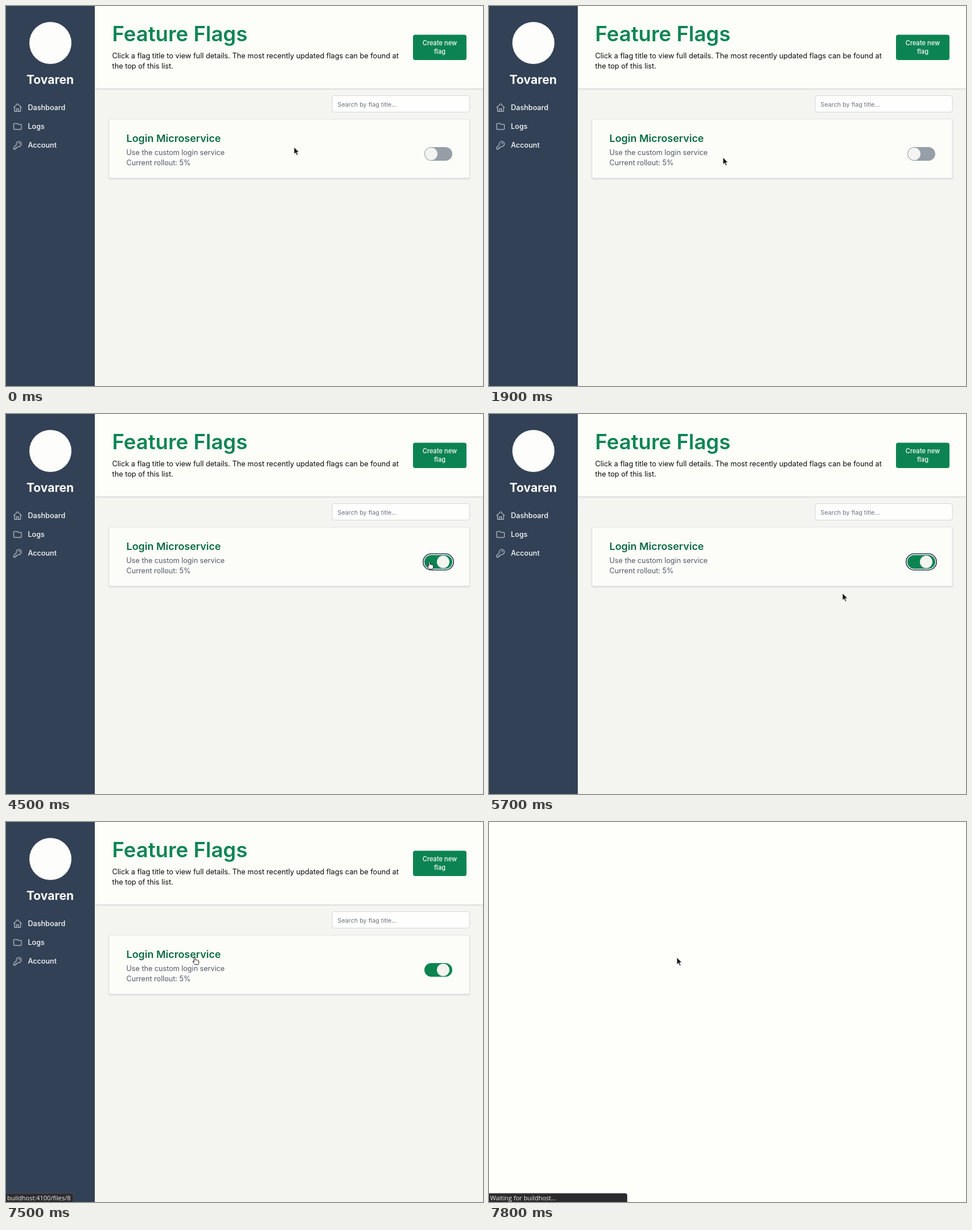
Animation, 838 px wide and 668 px high, one loop 8 s. Source, as an HTML page:

```html
<!DOCTYPE html>
<html lang="en">
<head>
<meta charset="utf-8">
<title>Feature flags</title>
<style>
  html, body { margin: 0; width: 100%; height: 100%; overflow: hidden; }
  svg { display: block; font-family: Inter, sans-serif; font-size: 12.73px; }
  .h { font-weight: 600; }
  .nav text { fill: #fbfcfa; font-size: 12.6px; font-weight: 500; }
  .nav path { fill: none; stroke: #a4adb8; stroke-width: 2; stroke-linecap: round; stroke-linejoin: round; }
  .grey { fill: #4f5966; font-size: 12.6px; }
  .btn { fill: #fdfdfa; font-size: 11.1px; font-weight: 500; text-anchor: middle; }
  .tip { fill: #f2f2f0; font-family: "Open Sans", sans-serif; font-size: 11px; }
  .card { filter: drop-shadow(0 1px 1px rgba(30, 40, 60, .2)); }
</style>
</head>
<body>
<svg width="838" height="668" viewBox="0 0 838 668">
  <rect width="838" height="668" fill="#f4f4f1"/>
  <rect class="card" x="156" width="682" height="145" fill="#fdfdf9"/>
  <rect width="156" height="668" fill="#324156"/>

  <circle cx="78" cy="65" r="37" fill="#fdfdfb"/>
  <text x="77.5" y="136.5" fill="#fdfdfb" font-size="21" font-weight="700" text-anchor="middle">Tovaren</text>
  <g id="nav" class="nav"></g>

  <text class="h" x="186.5" y="62" fill="#0f8554" font-size="36.5">Feature Flags</text>
  <g fill="#0b0c0b">
    <text x="186.5" y="92.3">Click a flag title to view full details. The most recently updated flags can be found at</text>
    <text x="186.5" y="110.3">the top of this list.</text>
  </g>
  <rect x="715" y="50.5" width="94" height="44.5" rx="4" fill="#0c8452"/>
  <text class="btn" x="762" y="69">Create new</text>
  <text class="btn" x="762" y="84">flag</text>

  <rect x="573" y="157.5" width="241.3" height="29" rx="4" fill="#fefefd" stroke="#d2d5da"/>
  <text x="582.5" y="176.5" fill="#6c7480" font-size="10.75">Search by flag title...</text>

  <rect class="card" x="181" y="199" width="633" height="103.4" rx="1.5" fill="#fcfcf9" stroke="#e3e4e4" stroke-width=".7"/>
  <text class="h" x="211.5" y="239" fill="#0b6c44" font-size="17.95">Login Microservice</text>
  <text class="grey" x="211.5" y="261.8">Use the custom login service</text>
  <text class="grey" x="211.5" y="279.8">Current rollout: 5%</text>

  <rect id="ring" x="732.8" y="245.8" width="53.4" height="28.4" rx="14.2" fill="#fefefd" stroke="#22344a" stroke-width="1.6"/>
  <rect id="track" x="735" y="248" width="49" height="24" rx="12"/>
  <circle id="knob" cy="260" r="11" fill="#f4f4f0"/>

  <rect id="blank" width="838" height="668"/>
  <g id="status">
    <rect id="bar" x="-4" y="653" height="20" rx="3" fill="#2b2b2d" stroke="#4b4b4c"/>
    <text id="note" class="tip" x="2" y="664.8"></text>
  </g>

  <g id="cursor">
    <path id="arrow" d="M0 0V12.6L2.9 9.9L4.9 14.6L7 13.7L5 9.1H8.8Z" fill="#161616" stroke="#f4f4f4" stroke-width=".9"/>
    <path id="hand" d="M-1.3 7.6V.5a1.1 1.1 0 0 1 2.2 0V4.4Q2.5 3.7 3 4.9Q4.5 4.3 5 5.5Q6.8 5 6.8 7V9Q6.8 11 5.5 12.8H0Q-1.5 10.5-3.6 8Q-4.2 6.5-3 6.2Z" fill="#fdfdfd" stroke="#1c1c1c"/>
    <path id="beam" d="M-2.5-6.5H2.5M0-6.5V6.5M-2.5 6.5H2.5" fill="none" stroke="#222"/>
  </g>
</svg>
<script>
  const LOOP = 8000, STEP = 100;
  const PRESS = 4100, BLUR = 7500, LEAVE = 7700, LOAD = 7800;
  const el = id => document.getElementById(id);
  const show = (id, on) => el(id).setAttribute('visibility', on ? 'visible' : 'hidden');
  const set = (id, name, value) => el(id).setAttribute(name, value);
  const progress = (t, from, to) => Math.min(1, Math.max(0, (t - from) / (to - from)));
  const easeOut = k => Math.sin(k * Math.PI / 2);
  const easeInOut = k => k * k * (3 - 2 * k);

  const links = {
    Dashboard: 'M3 12l9-9 9 9M5 10v11h14V10M9.5 21v-6h5v6',
    Logs: 'M3 7v10a2 2 0 002 2h14a2 2 0 002-2V9a2 2 0 00-2-2h-6l-2-2H5a2 2 0 00-2 2z',
    Account: 'M3 21v-4l6.3-6.3a6 6 0 1 1 4 4L11 17H9v2H7v2zM15 7a2 2 0 0 1 2 2'
  };
  el('nav').innerHTML = Object.entries(links).map(([name, icon], i) => `
    <g transform="translate(0 ${178.5 + 33.2 * i})">
      <path transform="translate(11.3 -9) scale(.75)" d="${icon}"/>
      <text x="38.5" y="4.5">${name}</text>
    </g>`).join('');

  // Pointer moves: start, end, x, y reached
  const moves = [
    [500, 900, 466, 253],
    [1000, 1400, 401, 264],
    [1600, 1900, 411, 266],
    [2000, 3400, 744, 260],
    [5000, 5200, 736, 262],
    [5300, 5700, 621, 315],
    [5800, 6200, 448, 299],
    [6300, 6500, 405, 273],
    [6600, 7300, 332, 238]
  ];

  function pointer(t) {
    let x = 506, y = 248;
    for (const [from, to, toX, toY] of moves) {
      const k = easeOut(progress(t, from, to));
      x += (toX - x) * k;
      y += (toY - y) * k;
    }
    return [x, y];
  }

  const within = (x, y, left, top, right, bottom) =>
    x >= left && x <= right && y >= top && y <= bottom;

  function draw(ms) {
    const t = Math.floor(ms % LOOP / STEP) * STEP;
    const [x, y] = pointer(t);
    const gone = t >= LEAVE, dark = gone && t < LOAD;

    const onTitle = !gone && within(x, y, 212, 222, 377, 244);
    const onToggle = within(x, y, 735, 248, 784, 272);
    const onText = within(x, y, 212, 248, 384, 284);
    const shape = onTitle || onToggle ? 'hand' : onText ? 'beam' : 'arrow';
    for (const id of ['hand', 'beam', 'arrow']) show(id, id === shape);
    set('cursor', 'transform', `translate(${gone ? x - 2 : x} ${y})`);

    const on = easeInOut(progress(t, PRESS, PRESS + 400));
    const mix = (a, b) => Math.round(a + (b - a) * on);
    set('knob', 'cx', 747 + 21 * on);
    set('track', 'fill', `rgb(${mix(150, 12)},${mix(159, 132)},${mix(168, 82)})`);
    show('ring', t >= PRESS && t < BLUR);

    show('blank', gone);
    set('blank', 'fill', dark ? '#181a19' : '#fefefb');
    show('status', onTitle || gone);
    set('bar', 'width', gone ? 246.5 : 122);
    el('note').textContent = dark ? 'buildhost' : gone ? 'Waiting for buildhost…' : 'buildhost:4100/files/8';
  }

  const start = performance.now();
  function tick() {
    draw(performance.now() - start);
    requestAnimationFrame(tick);
  }
  tick();
</script>
</body>
</html>
```
